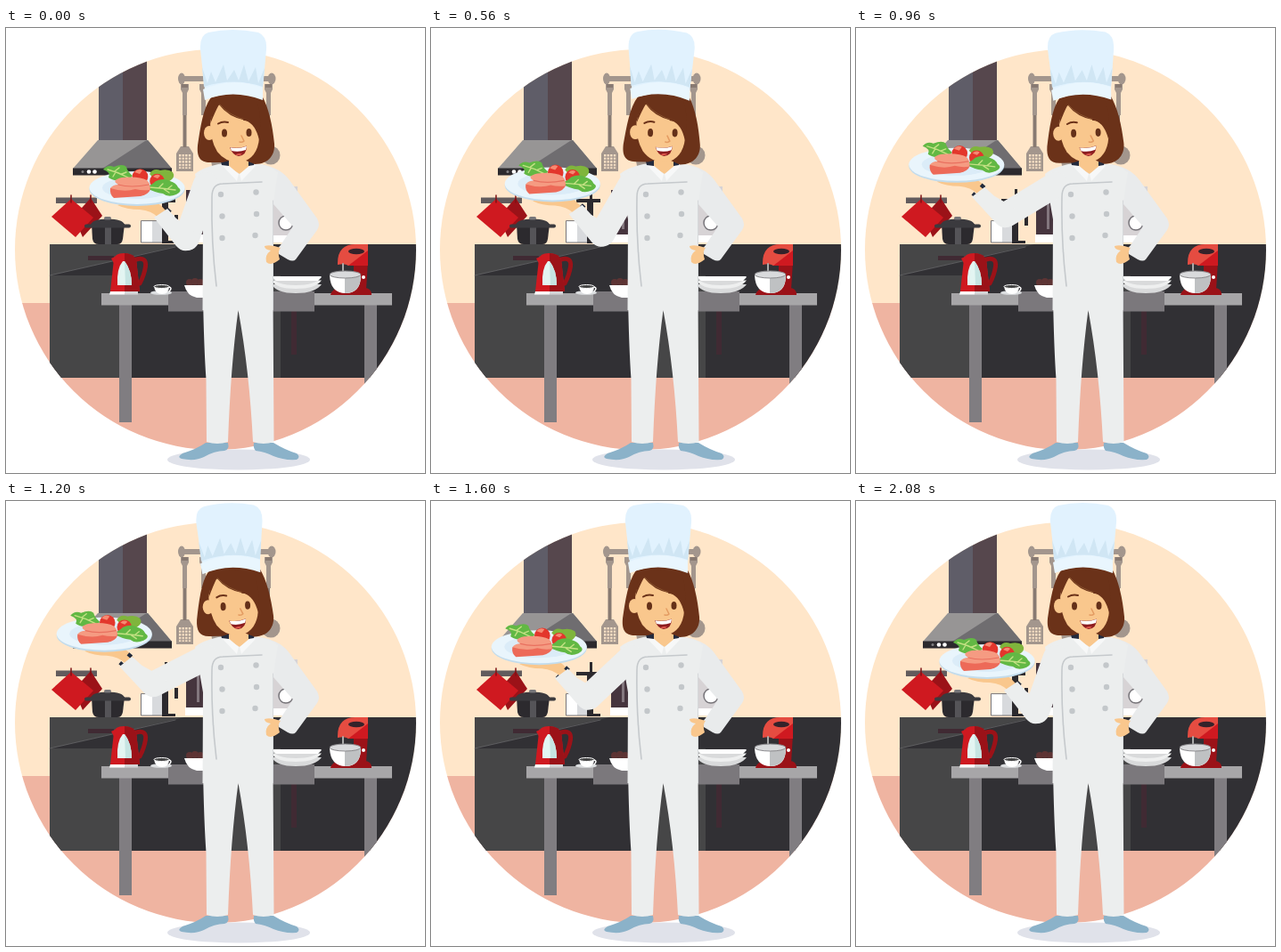
These frames come from a looping animation (470 px wide and 500 px high, 2.4 s). An HTML page:

```html
<!DOCTYPE html>
<html lang="en">
<head>
<meta charset="utf-8">
<title>Chef</title>
<style>
  html, body { margin: 0; width: 100%; height: 100%; overflow: hidden; background: #fff; }
  svg { display: block; width: 470px; height: 500px; }
  .skin { fill: #f9c78d; }
  .coat { fill: #eceeee; }
  .red { fill: #cf1920; }
  .wine { fill: #9b1218; }
  .black { fill: #2c2a2e; }
  .steel { fill: #a3968d; }
  .hair { fill: #6b3219; }
  .leaf { fill: #62b844; }
  .line { fill: none; stroke-linecap: round; stroke-linejoin: round; }
</style>
</head>
<body>
<svg viewBox="0 0 470 500">
  <defs>
    <clipPath id="disc"><circle cx="235" cy="249" r="225"/></clipPath>
    <pattern id="mesh" x="194" y="142" width="3.6" height="3.6" patternUnits="userSpaceOnUse">
      <rect width="2.3" height="2.3" fill="#ffe6c9"/>
    </pattern>
  </defs>

  <g clip-path="url(#disc)">
    <path fill="#ffe6c9" d="M0 0H470V310H0z"/>
    <path fill="#efb4a1" d="M0 309H470V500H0z"/>

    <!-- extractor hood -->
    <path fill="#5f5d68" d="M104 20H131V127H104z"/>
    <path fill="#56474d" d="M131 20H158V127H131z"/>
    <path fill="#979595" d="M103 126H159L186 158H75z"/>
    <path fill="#6f6d70" d="M156 127L159 126 186 158H108z"/>
    <path class="black" d="M75 157.500H186V165.500H75z"/>
    <g fill="#fff"><circle cx="93" cy="161.500" r="2.300"/><circle cx="99.500" cy="161.500" r="2.300"/><circle cx="86" cy="161.500" r="1.500" opacity=".4"/></g>

    <!-- utensil rack -->
    <g class="steel">
      <path d="M195 54H301V60H195z"/>
      <ellipse cx="197" cy="57" rx="4" ry="6.500"/><ellipse cx="298" cy="57" rx="4.500" ry="6.500"/>
      <path d="M196 63h9v6l-2 4v25h-5V73l-2-4zM217 63h9v6l-2 4v25h-5V73l-2-4zM290 63h9v6l-2 4v25h-5V73l-2-4z"/>
      <path d="M196 133h9l5 8v20h-19v-20z"/>
      <path d="M230 149h13v7l-7 2-5-3z"/>
      <circle cx="297" cy="143" r="10.500"/>
    </g>
    <path fill="#887a72" d="M198.500 98h4v36h-4zM292 98h4v36h-4zM197 63h7v4h-7zM291 63h7v4h-7z"/>
    <path fill="url(#mesh)" d="M194 142h14v16h-14z"/>

    <!-- pot holders -->
    <path fill="#625b5d" d="M56 190.500H102V197H56z"/>
    <path class="wine" d="M95 191L108 211 86 235 76 212z"/>
    <path class="red" d="M73 192L98 213 78 235 51 212z"/>
    <path class="line" stroke="#7d1115" stroke-width="1.500" d="M73 188v8M95 188v8"/>

    <!-- coffee press, oven -->
    <path fill="#fff" d="M151 217h13v24h-13z"/>
    <path fill="#d8dadd" d="M164 217h12v24h-12z"/>
    <path class="line" stroke="#77767a" d="M151.500 217v24h25v-24z"/>
    <path class="black" d="M178 181h3v11h9v4h-8v43h8v3h-15V196h-12v-4h15zM189 210h4v12h-4z"/>
    <path fill="#46353e" d="M202 182h24v51h-24z"/>
    <path fill="#83777e" d="M214 190h3v36h-3z"/>
    <path fill="#fff" d="M201 232h25v9h-25zM295 232h27v9h-27z"/>
    <path fill="#d7d3d5" d="M295 178h32v55h-32z"/>
    <circle cx="314" cy="219" r="8" fill="#fff" stroke="#77757a" stroke-width="1.500"/>

    <!-- counter -->
    <path fill="#313034" d="M49 243H470V393H49z"/>
    <path fill="#464647" d="M49 243H200L49 278zM49 278H134V393H49zM225 278H308V393H225z"/>
    <path class="line" stroke="#77777a" stroke-width=".6" d="M49 278L190 246"/>
    <path fill="#402a33" d="M92 256h29v5H92zM320 318h6v49h-6z"/>

    <!-- pot -->
    <path class="black" d="M96 220H133L131 237Q130 243 125 243H104Q98 243 97 237z"/>
    <path fill="#555458" d="M111 221h7v22h-7z"/>
    <path fill="#3b3a3e" d="M95 221Q97 214.500 114 214.500T133 221z"/>
    <rect x="88" y="220.500" width="52" height="4" rx="2" fill="#3b3a3e"/>
    <rect x="110" y="212" width="8" height="3.500" rx="1.700" fill="#77777a"/>

    <!-- table -->
    <path fill="#807d81" d="M127 310h14v133h-14zM402 310h14v133h-14z"/>
    <path fill="#a7a6a8" d="M107 298H433V311.500H107z"/>
    <path fill="#7b787c" d="M182 296H346V318.500H182z"/>
  </g>

  <!-- kettle -->
  <path class="line" stroke="#9b1218" stroke-width="5" d="M146 260Q158 257 156.500 268 155 278 150 287"/>
  <path class="red" d="M121 260Q122 253 132 253T146 260L150 296H117z"/>
  <path class="wine" d="M133 253Q144 254 146 260L150 296H133z"/>
  <path class="red" d="M118 259l6-3-1 12z"/>
  <path fill="#e3f5f2" d="M131 262Q124 270 125 289H141Q141 272 133 262z"/>
  <path fill="#c6e4e2" d="M133 262Q141 272 141 289H134z"/>
  <path fill="#fff" d="M117 296h16v3.500h-17z"/><path fill="#d4d4d6" d="M133 296h15v3.500h-15z"/>

  <!-- cup, bowl, plates -->
  <ellipse cx="174" cy="297.500" rx="12" ry="2.300" fill="#dcdee0"/>
  <path class="line" stroke="#fff" stroke-width="1.500" d="M183 291q4 1 0 5"/>
  <path fill="#fff" d="M166 290H183Q183 299 175 299 167 299 166 290z"/>
  <ellipse cx="174.500" cy="290.500" rx="8.500" ry="2" fill="#444" stroke="#fff"/>
  <g fill="#5d3434"><circle cx="206" cy="286" r="4"/><circle cx="212" cy="285" r="4"/><circle cx="218" cy="286" r="4"/></g>
  <path fill="#fff" d="M200 289H228V303H214Q203 301 200 289z"/>
  <path fill="#d9dadb" d="M298 288H354Q347 298 325 298T298 288z"/>
  <path fill="#eeefef" d="M298 283.500H354Q347 293 325 293T298 283.500z"/>
  <path fill="#d9dadb" d="M298 280H354Q347 289 325 289T298 280z"/>
  <path fill="#fff" d="M298 279H354L350 284H303z"/>

  <!-- mixer -->
  <path class="wine" d="M390 262H406L404 294H390z"/>
  <path class="wine" d="M364 300Q366 292 376 292H402Q410 292 410 300z"/>
  <path fill="#e54c41" d="M372 264Q372 243 392 243H406V267H384Q380 264 372 266z"/>
  <path class="red" d="M384 267L406 250V267z"/>
  <ellipse cx="393" cy="251" rx="9" ry="3.300" fill="#34222a"/>
  <path class="line" stroke="#aaa" stroke-width="2" d="M378 265v9"/>
  <path fill="#fff" d="M363 278H398Q398 298 381 298T363 278z"/>
  <path fill="#bfc1c3" d="M380 278H398Q398 298 380 298z"/>
  <ellipse cx="380.500" cy="277" rx="17.500" ry="4" fill="#d9dadc" stroke="#8b8a8d"/>
  <circle cx="401" cy="280" r="2" fill="#fff"/>

  <!-- body -->
  <ellipse cx="261" cy="485" rx="80" ry="11.500" fill="#e0e2ea"/>
  <g fill="#8bb2c9">
    <path d="M224 466H249Q251 474 245 475 234 475 222 482 212 487 197 484 191 482 198 478 214 473 224 466z"/>
    <path d="M278 466H300Q313 474 326 478 331 482 326 485 312 486 300 481 290 476 280 475 277 472 278 466z"/>
  </g>
  <path class="coat" d="M221 300Q222 360 224.500 395L225 465Q237 469 249 465Q252 380 260.500 317Q273 385 277 465Q289 469 300.500 465L299.500 300z"/>
  <path fill="#e9ebec" d="M286 153Q308 157 318 171L349 214Q353 221 349 227L325 260Q322 263 316 260L306 254Q303 248 308 244L322 223 300 198z"/>
  <path class="coat" d="M238 153Q220 157 212 164L221 215 220.500 317H299.500V198L305 162Q300 156 284 153L262 150z"/>
  <path class="line" stroke="#d5d8da" d="M299.500 194V316"/>
  <path class="skin" d="M308 247Q297 243 290 245 290 249 297 250 290 255 292 263 297 268 307 260 304 251 308 247z"/>
  <line id="upper" x1="224" y1="176" stroke="#eceeee" stroke-width="28.500" stroke-linecap="round"/>
  <path class="line" stroke="#c5c9cc" stroke-width="1.600" d="M236 290Q230 240 231 190 231 175 243 175L287 173"/>
  <g fill="#c3c7ca">
    <circle cx="241" cy="187" r="3.200"/><circle cx="280.500" cy="184.500" r="3.200"/>
    <circle cx="242.500" cy="211.500" r="3.200"/><circle cx="281" cy="209" r="3.200"/>
    <circle cx="242.500" cy="236" r="3.200"/><circle cx="279.500" cy="233" r="3.200"/>
  </g>
  <path class="skin" d="M248 145H274V156L262 164 249 156z"/>
  <path fill="#f7f8f8" d="M248 153L261 164 259 172 243 155zM275 153L262 164 264 172 280 155z"/>
  <path fill="#232a3d" d="M241 150L250 147 250 155 242 154zM279 150L272 147 272 155 278 154z"/>

  <!-- tray and forearm -->
  <g id="tray">
    <path class="skin" d="M125 199Q136 193 150 192L168 195Q174 199 180 206L171 213Q163 205 150 204 135 204 125 199z"/>
    <g id="forearm">
      <path id="cuff" class="line" stroke="#222b3d" stroke-width="5" style="stroke-linecap:butt" d="M167 212L170 209M177 203L180 200"/>
      <path class="coat" d="M181 203L166 213 191 245Q198 253 207 249L217 234 203 222 191 214z"/>
    </g>
    <ellipse cx="147" cy="181" rx="53.500" ry="19" fill="#c3dcec"/>
    <ellipse cx="147" cy="179.500" rx="53.500" ry="18.500" fill="#e9f5fc"/>
    <ellipse cx="147" cy="179.500" rx="39" ry="12.500" fill="#dbecf8"/>
    <path fill="#7fb53c" d="M161 164Q165 157 173 160 182 158 187 162 191 168 182 173 170 175 161 164z"/>
    <path class="leaf" d="M109 159Q114 153 121 156 131 152 135 156 136 161 142 166 140 170 132 170 121 173 115 168 118 162 109 159z"/>
    <path class="line" stroke="#c4e184" stroke-width="1.400" d="M114 159Q126 162 137 168M122 161l5-4M123 162l-3 5M130 164l5-2"/>
    <circle cx="150.500" cy="167" r="8.800" fill="#e3362c"/><circle cx="169.500" cy="172" r="8.300" fill="#e3362c"/>
    <path fill="#f58a72" d="M144 162q4-5 9-2l-3 4zM165 167q4-4 8-1l-3 3z"/>
    <path class="leaf" d="M156 179Q163 177 168 172 177 168 184 172 191 174 193 179 199 183 191 187 182 191 176 186 167 185 156 179z"/>
    <path class="line" stroke="#c4e184" stroke-width="1.400" d="M161 179Q176 180 190 182M171 180l5-5M177 181l6 4M181 181l5-4"/>
    <path fill="#ed6a58" d="M117 180Q116 187 121 191L151 189Q160 187 162 181L160 174z"/>
    <path fill="#f59b82" d="M117 180Q120 176 126 176 117 171 130 168 149 166 158 171 163 176 161 182 153 183 145 181 133 185 117 180z"/>
    <path class="line" stroke="#e9705f" stroke-width="1.200" d="M126 176Q140 180 160 176"/>
  </g>

  <!-- head -->
  <g id="head">
    <path class="hair" d="M230 78C221 90 218 112 215 132 214 144 217 151 229 151H243L262 146 279 153C295 153 302 142 301 130 299 110 295 90 287 76L262 70z"/>
    <ellipse cx="228" cy="118" rx="6" ry="8" class="skin"/>
    <path class="skin" d="M234 88Q259 79 281 104L284 124Q282 146 264 151 247 152 237 139 229 126 229 106z"/>
    <path class="hair" d="M231 96Q231 86 239 78L278 77Q288 90 284 126 280 108 269 104 249 100 239 86 235 93 229 108z"/>
    <path class="line" stroke="#8f5a32" stroke-width=".8" d="M240 86Q250 99 272 104"/>
    <path class="line" stroke="#6b3219" stroke-width="2" d="M238 107.500q5-3 11-1.500M267 103q6 0 9 4"/>
    <g fill="#643019"><ellipse cx="245" cy="118" rx="3" ry="4.600"/><ellipse cx="272.500" cy="117.500" rx="3" ry="4.600"/></g>
    <path class="line" stroke="#e39b62" stroke-width="1.500" d="M264 121l3 6q-2 2-5 1"/>
    <path fill="#8d1d20" d="M251 134Q261 136 270 132.500 270 143 261 144 254 143 251 134z"/>
    <path fill="#fff" d="M251.500 134.300Q261 136 270 132.700L269 137Q261 140 253 138z"/>
    <path fill="#e35a4e" d="M257 142.500Q261 140 265 141.500 262 144 257 142.500z"/>
    <path fill="#e1f2fe" d="M223 70L218 24Q217 8 227 5 254-1 283 5 293 9 292 24L288 69z"/>
    <path fill="#d0e6f4" d="M222 66L220 44 226 62 230 49 235 61 244 41 248 59 256 47 261 59 267 41 272 60 280 44 283 62 290 45 288 66Q255 55 222 66z"/>
    <path fill="#e9f6fe" d="M221 69Q254 54 288 67L288 81Q254 68 223 81z"/>
  </g>
</svg>

<script>
  const LOOP = 2400, STEP = 80, LAST = 2080;
  const REACH = 65, REST = 18, SWING = 43;
  const shoulder = { x: 223, y: 174 };

  // [time, value] pairs
  const armKeys = [[0, 0], [400, 0], [560, .24], [720, .51], [960, .9], [1120, .98],
                   [1200, 1], [1440, .85], [1680, .51], [2080, 0]];
  const headKeys = [[0, 0], [400, 3], [720, 0], [1120, -2], [1200, -1.9], [1440, 0], [2080, 0]];

  const el = id => document.getElementById(id);
  const upper = el('upper'), tray = el('tray'), forearm = el('forearm'), cuff = el('cuff'), head = el('head');

  function valueAt(keys, t) {
    const i = Math.max(1, keys.findIndex(k => k[0] >= t));
    const [t0, a] = keys[i - 1], [t1, b] = keys[i];
    return a + (b - a) * (t - t0) / (t1 - t0);
  }

  function elbowAt(p) {
    const angle = (REST + SWING * p) * Math.PI / 180;
    return { x: shoulder.x - REACH * Math.sin(angle), y: shoulder.y + REACH * Math.cos(angle) };
  }

  const rest = elbowAt(0);

  function draw(now) {
    const t = Math.min(LAST, Math.floor(now % LOOP / STEP) * STEP);
    const p = valueAt(armKeys, t), elbow = elbowAt(p);
    upper.setAttribute('x2', elbow.x);
    upper.setAttribute('y2', elbow.y);
    tray.setAttribute('transform', `translate(${elbow.x - rest.x} ${elbow.y - rest.y})`);
    forearm.setAttribute('transform', `rotate(${-5 * p} ${rest.x} ${rest.y})`);
    cuff.setAttribute('transform', `translate(${4 - 4 * p} ${4 - 4 * p})`);
    head.setAttribute('transform', `rotate(${valueAt(headKeys, t)} 262 160)`);
  }

  const start = performance.now();
  function tick() {
    draw(performance.now() - start);
    requestAnimationFrame(tick);
  }
  tick();
</script>
</body>
</html>
```
